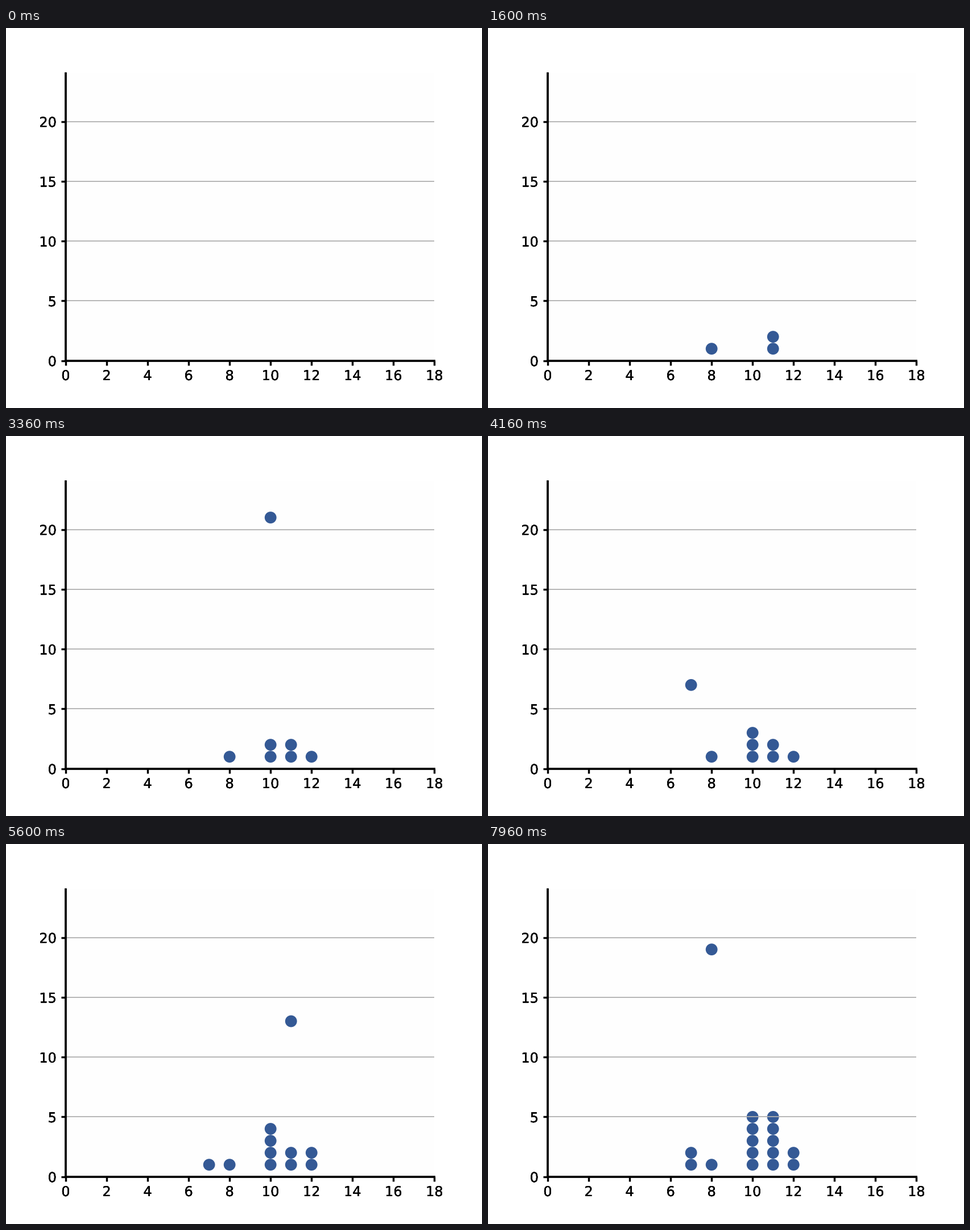
Recreate the animation shown at these times as a matplotlib script. Size 837 px wide and 669 px high, loop 8 s.

```python
import matplotlib.pyplot as plt
from matplotlib import patheffects
from matplotlib.animation import FuncAnimation
from matplotlib.patches import Ellipse

WIDTH, HEIGHT, DPI = 837, 669, 128
PX = 72 / DPI  # one pixel in points
LEFT, BOTTOM, AXES_W, AXES_H = 105, 83.3, 648.4, 505.3
X_MAX, Y_MAX = 18, 24
DOT = 20.8
FRAMES, INTERVAL = 200, 40
DROP_FROM = 23
COLUMNS = [11, 11, 8, 10, 10, 12, 10, 7, 12, 10, 11, 11, 7, 11, 10, 8]


def fall(target):
    """Heights of one dot: two units a step, slower at the end, then a rest."""
    y, heights = DROP_FROM, [DROP_FROM]
    while y > target:
        y -= 2 if y - 2 > target else 1
        heights.append(y)
    return heights + [target]


def build_states():
    """List the dots visible in each frame."""
    states, landed, counts = [[]], [], {}
    for x in COLUMNS:
        counts[x] = counts.get(x, 0) + 1
        for y in fall(counts[x]):
            states.append(landed + [(x, y)])
        landed = landed + [(x, counts[x])]
    return states[:FRAMES]


plt.rcParams["font.family"] = "DejaVu Sans"
fig = plt.figure(figsize=(WIDTH / DPI, HEIGHT / DPI), dpi=DPI, facecolor="white")
ax = fig.add_axes([LEFT / WIDTH, BOTTOM / HEIGHT, AXES_W / WIDTH, AXES_H / HEIGHT],
                  facecolor="#fefefe")
ax.set_xlim(0, X_MAX)
ax.set_ylim(0, Y_MAX)
ax.set_xticks(range(0, X_MAX + 1, 2))
ax.set_yticks(range(0, 21, 5))
ax.grid(axis="y", color="#b0b0b0", linewidth=1.8 * PX)
ax.tick_params(length=8 * PX, width=3.4 * PX, pad=8 * PX, labelsize=24 * PX)
ax.tick_params(axis="x", pad=7.2 * PX)
ax.spines[["top", "right"]].set_visible(False)
ax.spines[["left", "bottom"]].set_linewidth(3.8 * PX)

# Repeated drawing hardens the edges of the digits.
hard = [patheffects.Normal()] * 4
for label in ax.get_xticklabels() + ax.get_yticklabels():
    label.set_path_effects(hard)

dots = [ax.add_patch(Ellipse((0, 0), DOT * X_MAX / AXES_W, DOT * Y_MAX / AXES_H,
                             facecolor="#345995", linewidth=0, zorder=1))
        for _ in COLUMNS]
states = build_states()


def draw(frame):
    points = states[frame]
    for i, dot in enumerate(dots):
        dot.set_visible(i < len(points))
        if i < len(points):
            dot.set_center(points[i])
    return dots


anim = FuncAnimation(fig, draw, frames=FRAMES, interval=INTERVAL,
                     init_func=lambda: draw(0), repeat=True, repeat_delay=0)
plt.show()
```
